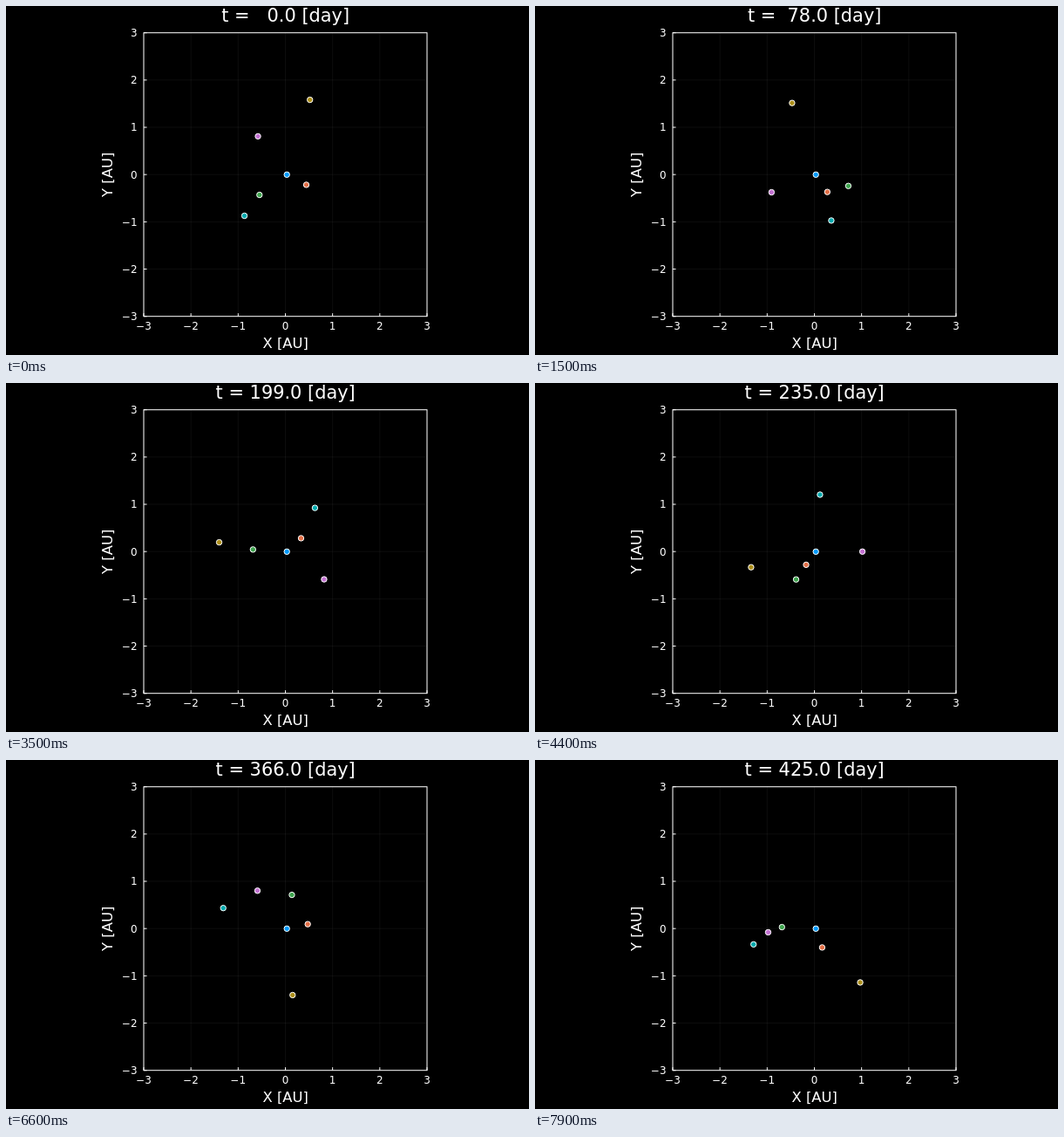
These frames come from a looping animation (600x400 px, 8000 ms). An HTML page:

```html
<!DOCTYPE html>
<html lang="en">
<head>
<meta charset="utf-8">
<title>Planet orbits</title>
<style>
  html, body { margin: 0; width: 100%; height: 100%; overflow: hidden; background: #000; }
  svg { display: block; width: 600px; height: 400px; }
  text { font-family: "DejaVu Sans", sans-serif; fill: #fff; text-anchor: middle; white-space: pre; }
  .tick { font-size: 11.95px; }
  .guide { font-size: 16.4px; }
  #title { font-size: 20.9px; }
  .grid { stroke: #fff; stroke-opacity: .1; stroke-width: .5; }
  .axis { stroke: #fff; fill: none; }
  circle { stroke: #fff; stroke-width: 1; }
</style>
</head>
<body>
<svg id="stage" viewBox="0 0 600 400">
  <text id="title" x="320.7" y="18"></text>
  <text class="guide" x="320.7" y="392">X [AU]</text>
  <text class="guide" transform="translate(121.5 193.3) rotate(-90)">Y [AU]</text>
</svg>
<script>
const stage = document.getElementById('stage');
const title = document.getElementById('title');
const UNIT = 325 / 6, CX = 320.5, CY = 193.2, HALF = 162.5;
const SUN_X = 322.2, SUN_Y = 193.3;
const RAD = Math.PI / 180;

function add(name, attrs, text) {
  const el = document.createElementNS('http://www.w3.org/2000/svg', name);
  for (const key in attrs) el.setAttribute(key, attrs[key]);
  if (text) el.textContent = text;
  return stage.appendChild(el);
}

const left = CX - HALF, right = CX + HALF, top_ = CY - HALF, bottom = CY + HALF;
for (let i = -3; i <= 3; i++) {
  const x = CX + i * UNIT, y = CY - i * UNIT;
  const label = String(i).replace('-', '\u2212');
  add('path', { class: 'grid', d: `M${x} ${top_}V${bottom}M${left} ${y}H${right}` });
  add('path', { class: 'axis', d: `M${x} ${bottom}v-3.5M${left} ${y}h3.5` });
  add('text', { class: 'tick', x, y: 371.3 }, label);
  add('text', { class: 'tick', x: 150.5, y: y + 4.4, style: 'text-anchor:end' }, label);
}
add('rect', { class: 'axis', x: left, y: top_, width: 2 * HALF, height: 2 * HALF });

const dot = fill => add('circle', { cx: SUN_X, cy: SUN_Y, r: 3.2, fill });
dot('#009afa');

// a in AU, e, perihelion angle and starting mean anomaly in degrees, period in days
const orbit = (color, a, e, peri, start, period) =>
  ({ a, e, peri: peri * RAD, start: start * RAD, rate: 2 * Math.PI / period, dot: dot(color) });
const planets = [
  orbit('#e36f47', .3871, .2056, 163.8, 163.2, 87.969),
  orbit('#3ea44e', .7233, .0068, 160, 55.8, 224.7),
  orbit('#c371d2', 1, .017, -35, 161.4, 365.25),
  orbit('#ac8e18', 1.5237, .0934, 234.2, -157.7, 686.98),
  orbit('#00aaae', 1.1896, .1902, 340, -95.1, 473.9)
];

function eccentric(p, day) {
  const m = p.start + p.rate * day;
  let E = m;
  for (let i = 0; i < 20; i++) E = m + p.e * Math.sin(E);
  return E;
}

// Time advances in adaptive steps, nearly even in the inner planet's true anomaly.
const inner = planets[0], SKEW = .12;
const beta = inner.e / (1 + Math.sqrt(1 - inner.e ** 2));

function phaseAt(day) {
  const E = eccentric(inner, day);
  const nu = E + 2 * Math.atan(beta * Math.sin(E) / (1 - beta * Math.cos(E)));
  return nu + SKEW * Math.sin(nu);
}

function dayAt(phase) {
  let nu = phase;
  for (let i = 0; i < 20; i++) nu = phase - SKEW * Math.sin(nu);
  const E = nu - 2 * Math.atan(beta * Math.sin(nu) / (1 + beta * Math.cos(nu)));
  return (E - inner.e * Math.sin(E) - inner.start) / inner.rate;
}

const knots = [[0, .01], [15, 78.05], [35, 199.95], [44, 235.95], [56, 308.95], [66, 366.05], [79, 425.3]]
  .map(([step, day]) => [step, phaseAt(day)]);

function dayOfStep(step) {
  const k = knots.findIndex(([s], i) => i && step <= s);
  const [s0, p0] = knots[k - 1], [s1, p1] = knots[k];
  return dayAt(p0 + (p1 - p0) * (step - s0) / (s1 - s0));
}

function draw(step) {
  const day = dayOfStep(step);
  title.textContent = `t = ${Math.floor(day).toFixed(1).padStart(5)} [day]`;
  for (const p of planets) {
    const E = eccentric(p, day);
    const u = p.a * (Math.cos(E) - p.e);
    const v = p.a * Math.sqrt(1 - p.e ** 2) * Math.sin(E);
    const c = Math.cos(p.peri), s = Math.sin(p.peri);
    p.dot.setAttribute('cx', SUN_X + UNIT * (u * c - v * s));
    p.dot.setAttribute('cy', SUN_Y - UNIT * (u * s + v * c));
  }
}

const began = performance.now();
function tick() {
  draw(Math.floor((performance.now() - began) / 100) % 80);
  requestAnimationFrame(tick);
}
tick();
</script>
</body>
</html>
```
